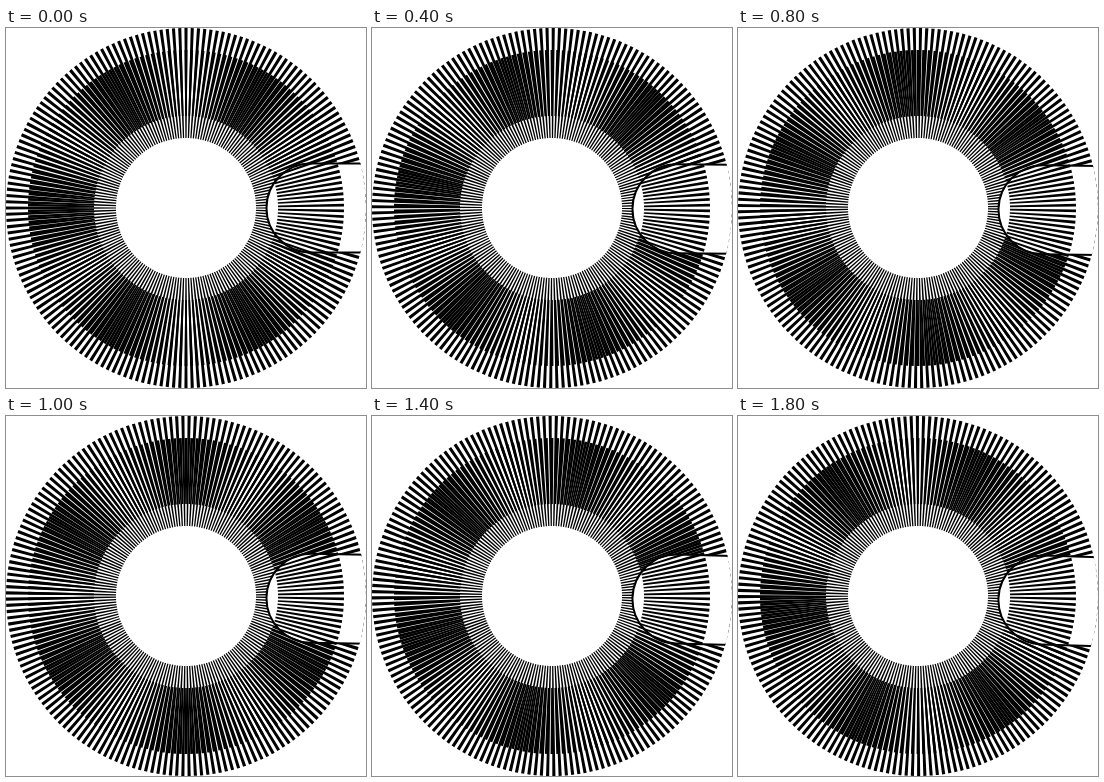
Animation, 360 px wide and 360 px high, one loop 2 s. Source, as an HTML page with a canvas:

```html
<!DOCTYPE html>
<html>
<head>
<meta charset="utf-8">
<style>
html, body { margin: 0; height: 100%; overflow: hidden; background: #fff; }
canvas { display: block; }
</style>
</head>
<body>
<canvas id="stage" width="360" height="360"></canvas>
<script>
const ctx = document.getElementById('stage').getContext('2d');
const LOOP = 2000, STEPS = 10;
const ROTOR = 180, STATOR = 174; // bars per ring
const NOTCH_X = 125, NOTCH_R = 44.5;

// Ring of wedge-shaped bars, each as wide as the gap beside it.
function grating(count, inner, outer, firstBar) {
  const pitch = 2 * Math.PI / count;
  ctx.beginPath();
  for (let i = 0; i < count; i++) {
    const from = (i + firstBar - 0.25) * pitch, to = from + pitch / 2;
    ctx.moveTo(inner * Math.cos(from), inner * Math.sin(from));
    ctx.arc(0, 0, outer, from, to);
    ctx.arc(0, 0, inner, to, from, true);
    ctx.closePath();
  }
  ctx.fill();
}

function notch() {
  ctx.beginPath();
  ctx.arc(0, 0, 180, 0, 2 * Math.PI);
  ctx.clip();
  ctx.beginPath();
  ctx.moveTo(200, NOTCH_R);
  ctx.arc(NOTCH_X, 0, NOTCH_R, Math.PI / 2, Math.PI * 1.5);
  ctx.lineTo(200, -NOTCH_R);
  ctx.fillStyle = '#fff';
  ctx.fill();
  ctx.lineWidth = 2;
  ctx.stroke();
}

function draw(time) {
  const step = Math.floor(time % LOOP / LOOP * STEPS);
  ctx.setTransform(1, 0, 0, 1, 180, 180);
  ctx.fillStyle = '#fff';
  ctx.fillRect(-180, -180, 360, 360);
  ctx.fillStyle = '#000';

  // The rotor advances by one bar per loop.
  ctx.save();
  ctx.rotate(step / STEPS * 2 * Math.PI / ROTOR);
  grating(ROTOR, 70, 180, 0);
  notch();
  ctx.restore();

  grating(STATOR, 92, 158, 0.5);
}

const start = performance.now();
function tick() {
  draw(performance.now() - start);
  requestAnimationFrame(tick);
}
tick();
</script>
</body>
</html>
```
